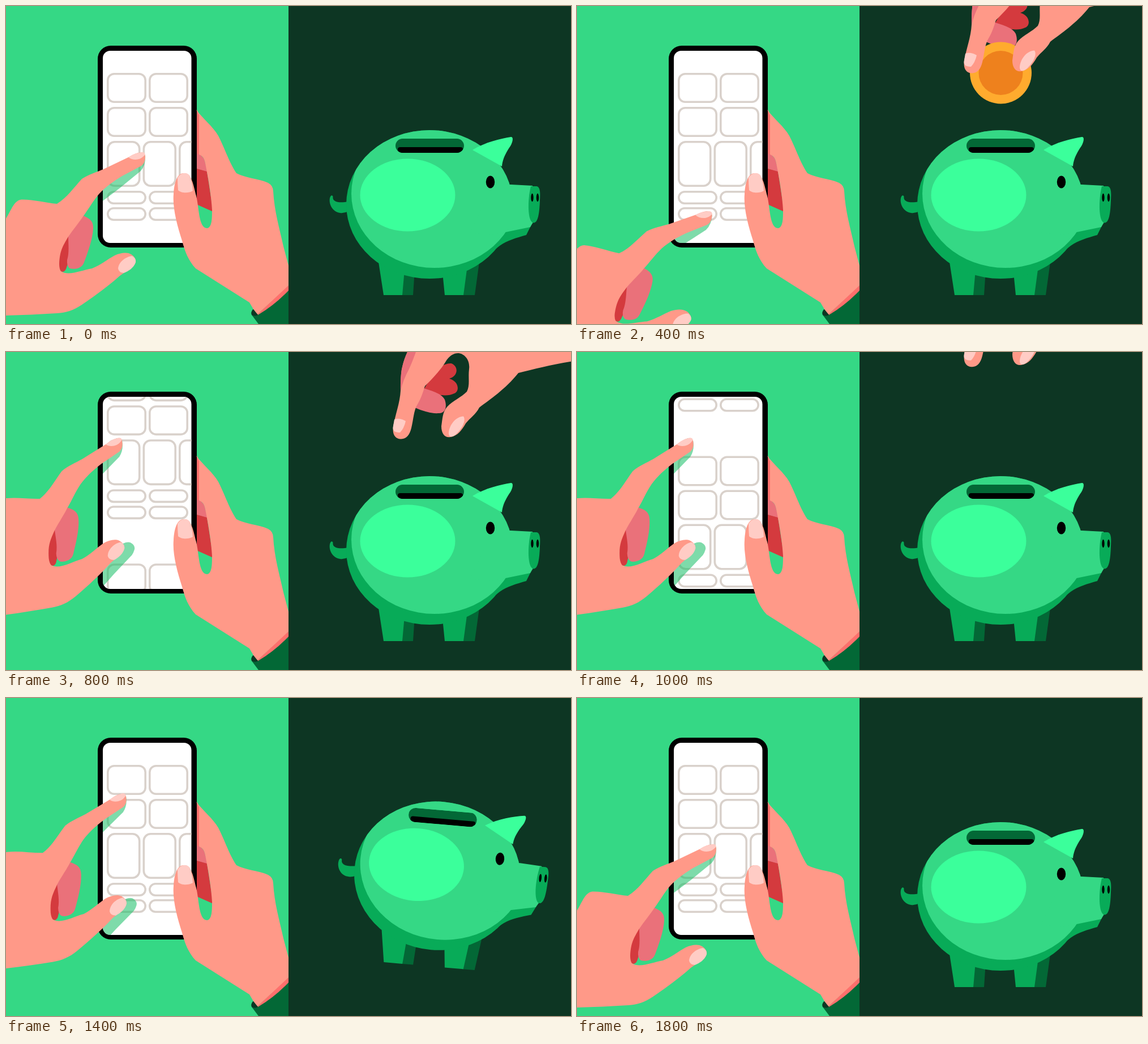
An HTML page for the animation above (2000 ms loop, 998 px wide and 561 px high).

```html
<!DOCTYPE html>
<html lang="en">
<head>
<meta charset="utf-8">
<title>Saving by phone and piggy bank</title>
<style>
  html, body { margin: 0; width: 100%; height: 100%; overflow: hidden; background: #0d3623; }
  svg { display: block; width: 998px; height: 561px; }
  .skin { fill: #ff9988; }
  .nail { fill: #ffccc5; }
  .red { fill: #d43a3e; }
  .pink { fill: #ea717a; }
  .coral { fill: #ff6f6c; }
  .light { fill: #35d885; }
  .mid { fill: #08ab58; }
  .dark { fill: #036836; }
  .mint { fill: #3bff9b; }
  .tiles { fill: none; stroke: #d9d1cb; stroke-width: 3.6; }
  .shade { fill: #14be64; opacity: .55; }
</style>
</head>
<body>
<svg viewBox="0 0 998 561">
  <defs>
    <clipPath id="left"><rect width="499" height="561"/></clipPath>
    <clipPath id="right"><rect x="499" width="499" height="561"/></clipPath>
    <clipPath id="screen"><rect x="171" y="79" width="156.500" height="339" rx="13"/></clipPath>
    <clipPath id="aboveSlot"><rect x="499" width="499" height="256"/></clipPath>
    <clipPath id="body"><ellipse cx="748" cy="350" rx="147" ry="131"/></clipPath>
    <clipPath id="slot"><rect x="688" y="234" width="121" height="25" rx="12.500"/></clipPath>
  </defs>

  <g clip-path="url(#left)">
    <rect class="light" width="499" height="561"/>

    <!-- far side of the holding hand -->
    <path class="coral" d="M330 176L337 183L345 198V266H330Z"/>
    <path class="pink" d="M330 258L342 262Q349 266 351 273L356 293L330 285Z"/>
    <path class="red" d="M330 285L355 292L366 363L330 347Z"/>

    <rect x="162" y="70" width="175" height="356" rx="23"/>
    <g clip-path="url(#screen)">
      <rect x="171" y="79" width="157" height="339" fill="#fff"/>
      <g id="list" class="tiles">
        <g id="page"></g>
        <use href="#page" y="339"/>
      </g>
      <g class="shade hand">
        <path d="M236 258L246 264Q247 280 238 291L200 322L172 343L130 372L120 340Z"/>
        <path d="M205 446L227 444Q236 441 241 444Q249 450 246 457Q244 462 240.600 466L205 496L185 514L130 550L120 500Z"/>
      </g>
    </g>

    <!-- holding hand -->
    <path class="skin" d="M336 183C347 198 366 213 375 229C386 250 394 276 407 295
      C424 304 445 304 463 312Q472 317 472 327C474 362 483 392 490 424L499 458V494L443 545
      L430 523L335 463C322 449 316 433 311 414C302 386 294 356 296 332C297 312 302 294 315 295
      C328 295 331 316 336 335C341 354 340 392 355 392C364 391 364 374 364 360
      C363 338 358 308 354 288C351 270 350 266 341 262V193Z"/>
    <path class="nail" d="M303 303C309 293 320 292 325 300Q329 312 330 326C322 331 309 330 304 325Q303 314 303 303Z"/>
    <path class="coral" d="M499 493Q468 522 443 545L447 547Q478 527 499 503Z"/>
    <path class="dark" d="M499 502Q474 528 445 545L436 535Q432 540 434 545L446 561H499Z"/>
    <path fill="#0d3623" d="M437 535L445 545Q440 548 434 545Q432 539 437 535Z"/>

    <!-- tapping hand -->
    <g class="hand">
      <path class="red" d="M138 369L108 404L90 440L95 467Q102 472 106 464L114 440L122 400Z"/>
      <path class="pink" d="M137 370C148 375 155 380 154 393C153 412 144 436 138 452C134 464 120 465 113 463
        Q107 459 108 448C112 435 110 420 110 406Z"/>
      <path class="skin" d="M-90 500C-50 460 -18 410 0 375C9 361 14 343 27 341.500C48 341 68 347 90 349
        C108 338 120 320 134 305C146 297 160 293 172 288L218 266C229 259 240 256 245 260
        C247 268 246 277 239 282L205 300C190 309 176 319 164 332C153 345 146 358 137 370
        C130 381 119 394 110 407C100 424 95 432 94 455Q94 464 97 468C111 477 133 466 152 463
        C169 456 179 447 192 440C203 435 214 434 221 438Q230 444 229 452C225 463 210 469 201 476
        C181 494 156 512 134 527C119 537 106 541 90 542C60 544 30 545 0 546L-90 550Z"/>
      <path class="nail" d="M216.500 267Q224 261 234 259Q243 256 245 260Q246 263 243 265C237 272 224 273 216.500 267Z"/>
      <path class="nail" d="M198 463C199 451 212 442 223 441Q230 445 229 452C226 462 216 468 208 471Q199 470 198 463Z"/>
    </g>
  </g>

  <g clip-path="url(#right)">
    <rect x="499" width="499" height="561" fill="#0d3623"/>

    <g id="pig">
      <path class="dark" d="M698 465H722L719 510H700ZM812 450L836 452L828 510H806Z"/>
      <path class="mid" d="M657 445L667 510H700L704 465ZM771 470L775 510H808L815 458Z"/>
      <path class="mid" d="M605 362Q597 366 590 365C576 363 570 349 572 339C573 334 576 333 577.500 336C576 346 588 348 605 345Z"/>
      <path class="mid" d="M850 400L927 388L919 404C902 409 886 413 872 423L840 448Z"/>
      <ellipse class="mid" cx="748" cy="350" rx="147" ry="131"/>
      <ellipse class="light" cx="757" cy="331" rx="147" ry="131" clip-path="url(#body)"/>
      <path class="light" d="M860 315H892L930 317L932 380L926 390L858 404L820 400Z"/>
      <path class="mid" d="M927 318H937C944 319 944 330 943 345C942 366 940 382 932 382.500C921 382 921 342 927 318Z"/>
      <ellipse cx="929.500" cy="338" rx="2.200" ry="7.200"/>
      <ellipse cx="939" cy="338" rx="2.200" ry="7.200"/>
      <ellipse class="mint" cx="709.500" cy="333.500" rx="84" ry="64"/>
      <path class="mint" d="M824 254C847 240 873 234 892 231C897 231 895 240 891 247C882 260 877 271 876 283Z"/>
      <ellipse cx="855.500" cy="310.500" rx="7.700" ry="11"/>
      <g clip-path="url(#slot)">
        <rect class="dark" x="688" y="234" width="121" height="25"/>
        <rect x="692" y="249" width="115" height="10" rx="4"/>
      </g>
    </g>

    <g class="giver">
      <path class="red" d="M758 32Q774 20 786 20C799 24 800 42 783 47C801 52 801 70 792 73C778 80 756 76 738 66Z"/>
      <path class="pink" d="M738 64C754 69 770 74 775 84C779 96 777 107 765 108C750 109 736 104 722 98Z"/>
    </g>
    <g clip-path="url(#aboveSlot)">
      <g id="coin">
        <circle cx="748.500" r="54.500" fill="#ffab2e"/>
        <circle cx="748.500" r="39" fill="#ee811d"/>
      </g>
    </g>
    <g class="giver">
      <path class="skin" d="M740 -120C724 -60 716 -20 709 0C698 24 697 40 697 68C696 90 687 112 684 132
        C682 146 688 154 698 153.500C708 153 713 146 716 134C720 118 720 103 727 92
        C734 80 736 72 740 60C752 48 766 34 776 18C783 6 791 2 799 2C810 3 820 14 818 30
        C816 46 820 58 814 70C804 80 789 86 779 97C771 106 771 118 769 131C769 145 776 152 785 150
        C798 148 805 138 812 126C820 116 830 110 836 98C854 84 882 66 905 37C934 30 968 21 1010 15V-120Z"/>
      <path class="pink" d="M716 -24L732 -24Q722 8 712 30Q702 48 697 68Q697 40 699 30Q704 10 709 0Z"/>
      <path class="nail" d="M686 119C692 116 702 119 706 122Q703 135 696 142C688 142 683 140 683.500 133Z"/>
      <path class="nail" d="M782 143C783 128 795 114 808 113.500C813 120 806 134 798 142C790 151 782 152 782 143Z"/>
    </g>
  </g>
</svg>
<script>
const LOOP = 2000, STEP = 100, LAST = 18, PAGE = 339;
const $ = id => document.getElementById(id);
const move = (els, value) => els.forEach(el => el.setAttribute('transform', value));

// Phone page: x, y, width, height, corner radius
const inset = 1.8;
const pair = (y, h, r) => [[178, y, 70, h, r], [252, y, 70, h, r]];
const tiles = [
  ...pair(118, 53, 13), ...pair(178, 53, 13),
  ...[178, 241.5, 305].map(x => [x, 238, 59.5, 81, 14]),
  ...pair(326, 24, 12), ...pair(355, 24, 12)
];
$('page').innerHTML = tiles.map(([x, y, w, h, r]) =>
  `<rect x="${x + inset}" y="${y + inset}" width="${w - 2 * inset}" height="${h - 2 * inset}" rx="${r - inset}"/>`
).join('');

// Smooth cyclic curve through [step, value] keys, level at peaks and holds
function track(...keys) {
  const n = keys.length;
  const at = i => {
    const lap = Math.floor(i / n), [k, v] = keys[i - lap * n];
    return [k + lap * LAST, v];
  };
  const slope = i => {
    const [a, u] = at(i - 1), [, v] = at(i), [b, w] = at(i + 1);
    return (v - u) * (w - v) <= 0 ? 0 : (w - u) / (b - a);
  };
  return k => {
    let i = 0;
    while (i < n - 1 && at(i + 1)[0] <= k) i++;
    const [a, u] = at(i), [b, v] = at(i + 1);
    const d = b - a, p = (k - a) / d, q = 1 - p;
    return u * q * q * (1 + 2 * p) + v * p * p * (3 - 2 * p)
      + d * p * q * (slope(i) * q - slope(i + 1) * p);
  };
}

const tipX = track([0, 246], [4, 239], [8, 205], [12, 205], [14, 212], [16, 234]);
const tipY = track([0, 262], [4, 367], [8, 155], [12, 155], [14, 172], [16, 228]);
const giveY = track([0, -215], [4, -35], [6, 22], [8, 0], [12, -215]);
const tilt = track([0, 0], [12, 0], [14, 5], [16, -2.3]);

const clamp = p => Math.min(1, Math.max(0, p));
const inOut = p => p < .5 ? 4 * p ** 3 : 1 - 4 * (1 - p) ** 3;

const hands = document.querySelectorAll('.hand');
const givers = document.querySelectorAll('.giver');

function draw(k) {
  const y = tipY(k);
  move(hands, `translate(${tipX(k)} ${y}) rotate(${(y - 262) * .06}) translate(-246 -262)`);
  move([$('list')], `translate(0 ${-PAGE * inOut(clamp((k - 4.71) / 8.32))})`);

  const drop = giveY(k);
  move(givers, `translate(0 ${drop})`);
  const coinY = k <= 6 ? 153 + drop : 175 + 70 * (k - 6) ** 2;
  move([$('coin')], `translate(0 ${coinY})`);

  const hop = 38 * Math.max(0, 1 - ((k - 14.43) / 2.55) ** 2);
  move([$('pig')], `translate(0 ${-hop}) rotate(${tilt(k)} 748 510)`);
}

const start = performance.now();
let shown = -1;
function tick() {
  const t = (performance.now() - start) % LOOP;
  const k = Math.min(LAST, Math.floor(t / STEP)) % LAST;
  if (k !== shown) draw(shown = k);
  requestAnimationFrame(tick);
}
tick();
</script>
</body>
</html>
```
